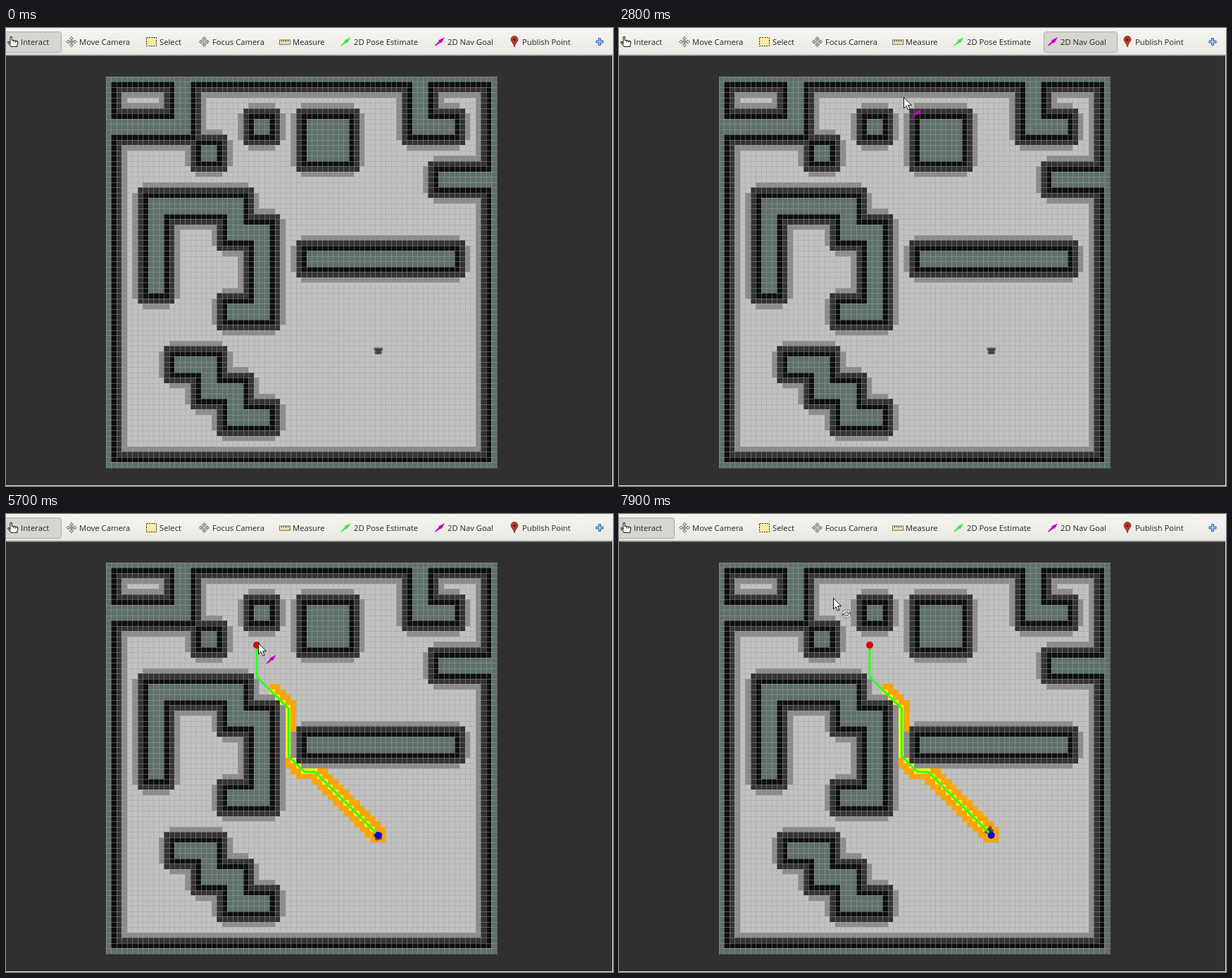
An HTML page with a canvas for the animation above (8000 ms loop, 862 by 650 pixels).

```html
<!DOCTYPE html>
<html lang="en">
<head>
<meta charset="utf-8">
<title>Grid path planning</title>
<style>
html, body { margin: 0; width: 100%; height: 100%; overflow: hidden; background: #303030; }
canvas, svg { position: absolute; left: 0; top: 0; display: block; }
text { font: 500 11.25px "Open Sans", "Noto Sans", sans-serif; fill: #262626; }
.btn { stroke-width: 1; }
.on { fill: #d7d5d0; stroke: #aaa8a2; }
.hover { fill: url(#lift); stroke: #b3b1ab; }

#interact, #navHover, #navOn, #plan, #route, #cursor, #goalIcon, #spinIcon {
  animation: 8s step-end infinite;
}
#interact { animation-name: interact; }
#navHover { animation-name: navHover; }
#navOn { animation-name: navOn; }
#plan, #route { animation-name: plan; }
#cursor { animation-name: show, move; }
#goalIcon { animation-name: goalIcon; }
#spinIcon { animation-name: spinIcon; }
#robot { animation: drive 8s steps(1) infinite; }

@keyframes interact { 0%, 50%, 100% { visibility: visible } 28.75% { visibility: hidden } }
@keyframes navHover { 0%, 28.75%, 100% { visibility: hidden } 10% { visibility: visible } }
@keyframes navOn { 0%, 50%, 100% { visibility: hidden } 28.75% { visibility: visible } }
@keyframes plan { 0% { visibility: hidden } 62.5%, 100% { visibility: visible } }
@keyframes show { 0% { visibility: hidden } 10%, 100% { visibility: visible } }
@keyframes goalIcon { 0%, 77.5%, 100% { visibility: hidden } 32.5% { visibility: visible } }
@keyframes spinIcon { 0% { visibility: hidden } 77.5%, 100% { visibility: visible } }
@keyframes move {
  0%, 10% { transform: translate(672px, 11px); animation-timing-function: steps(3) }
  13.75% { transform: translate(646px, 18px) }
  32.5% { transform: translate(659px, 12px); animation-timing-function: steps(2) }
  35% { transform: translate(404px, 98px) }
  36.25% { transform: translate(352px, 142px) }
  37.5% { transform: translate(336px, 180px); animation-timing-function: steps(2) }
  40% { transform: translate(336px, 217px); animation-timing-function: steps(2) }
  42.5% { transform: translate(344px, 224px) }
  43.75% { transform: translate(362px, 205px) }
  45% { transform: translate(364px, 190px) }
  46.25% { transform: translate(358px, 183px) }
  77.5% { transform: translate(375px, 184px); animation-timing-function: steps(3) }
  81.25% { transform: translate(550px, 205px) }
  82.5% { transform: translate(580px, 209px) }
  83.75% { transform: translate(589px, 210px); animation-timing-function: steps(3) }
  87.5% { transform: translate(570px, 209px) }
  88.75% { transform: translate(565px, 203px); animation-timing-function: steps(3) }
  92.5% { transform: translate(440px, 118px) }
  93.75% { transform: translate(385px, 100px) }
  95% { transform: translate(345px, 96px) }
  96.25% { transform: translate(320px, 102px); animation-timing-function: steps(2) }
  98.75%, 100% { transform: translate(304px, 119px) }
}
@keyframes drive {
  0%, 65% { transform: translate(528.7px, 458.2px); animation-timing-function: steps(9) }
  76.25% { transform: translate(528.4px, 457.2px) rotate(-20deg); animation-timing-function: steps(9) }
  87.5% { transform: translate(527.6px, 454.5px) rotate(-42deg); animation-timing-function: steps(9) }
  98.75%, 100% { transform: translate(525.8px, 449.8px) rotate(-45deg) }
}
</style>
</head>
<body>
<canvas id="map" width="862" height="650"></canvas>
<canvas id="plan" width="862" height="650"></canvas>
<svg width="862" height="650" viewBox="0 0 862 650">
  <defs>
    <linearGradient id="bar" x2="0" y2="1">
      <stop offset="0" stop-color="#f5f4f0"/><stop offset="1" stop-color="#eae8e1"/>
    </linearGradient>
    <linearGradient id="lift" x2="0" y2="1">
      <stop offset="0" stop-color="#ffffff"/><stop offset="1" stop-color="#f4f3f0"/>
    </linearGradient>
    <path id="dart" d="M0 12.2 6.4 5.4 5.6 4.6 14.5 0 9.8 8.2 8.7 7.4 1.6 12.6Z"/>
    <path id="cross" d="M7.5 0 10 3.2H8.3V6.7H11.8V5L15 7.5 11.8 10V8.3H8.3V11.8H10L7.5 15 5 11.8H6.7V8.3H3.2V10L0 7.5 3.2 5V6.7H6.7V3.2H5Z"/>
  </defs>

  <g id="robot" fill="#555">
    <path d="M-6-4.5H6L6.6-1.5 4.5 0 5.5 2.5 4 5H-4L-5.5 2.5-4.5 0-6.6-1.5Z"/>
    <path d="M-4-1.2H4M-2.5 2H2.5" stroke="#2c2c2c" stroke-width="1.4"/>
  </g>
  <g id="route">
    <path d="M356.2 186V231.5L401.4 276V344L424 366H439L528.5 455.5" fill="none" stroke="#30ff1c" stroke-width="3" stroke-linejoin="round"/>
    <circle cx="356" cy="186" r="5" fill="#e60000"/>
    <circle cx="528.7" cy="456" r="5" fill="#0808d0"/>
  </g>

  <rect width="862" height="38" fill="url(#bar)"/>
  <rect y="37" width="862" height="1" fill="#d2d0ca"/>
  <rect y="38" width="862" height="1.4" fill="#a3a29e"/>
  <path d="M861.5 39V650M0 649.5H862" stroke="#e9e8e4"/>
  <rect id="interact" class="btn on" x="-5.5" y="5.5" width="84" height="29" rx="3"/>
  <rect id="navHover" class="btn hover" x="603.5" y="5.5" width="104" height="29" rx="3"/>
  <rect id="navOn" class="btn on" x="603.5" y="5.5" width="104" height="29" rx="3"/>

  <path d="M6 22V13.3Q7.2 11.4 8.4 13.3V17.2L15 18.4Q17 18.8 16.7 21L15.5 26.5H7.2L2.7 20.8Q2.5 19 4.2 19.6Z" fill="#fff" stroke="#222" stroke-width="1.1"/>
  <path d="M10.8 18V20.5M13.4 18.5V20.8" stroke="#333"/>
  <use href="#cross" x="85.5" y="12" fill="#fff" stroke="#666"/>
  <circle cx="93" cy="19.5" r="2.2" fill="#999"/>
  <rect x="199.5" y="13.5" width="14" height="12" fill="#f7eca0" stroke="#222" stroke-dasharray="2 1.5"/>
  <g fill="none" stroke="#777">
    <use href="#cross" x="274" y="12" fill="#eee"/>
    <circle cx="281.5" cy="19.5" r="4.5"/>
  </g>
  <rect x="388.5" y="17" width="15" height="6.2" fill="#eee6b4" stroke="#77714f"/>
  <path d="M391.5 17V20M394.5 17V19.5M397.5 17V20M400.5 17V19.5" stroke="#55503a"/>
  <use href="#dart" x="475" y="13" fill="#35ee45"/>
  <use href="#dart" x="608.5" y="13" fill="#c000c0"/>
  <path d="M722 27Q721 23 718.4 19.8A5 5 0 1 1 725.6 19.8Q723 23 722 27Z" fill="#b83a2a" stroke="#872318" stroke-width=".7"/>
  <circle cx="722" cy="16.6" r="1.8" fill="#5d130d"/>
  <path d="M841.5 14.5H844.5V18H848V21H844.5V24.5H841.5V21H838V18H841.5Z" fill="#9cc0ec" stroke="#2c62ae"/>
  <g id="labels"></g>

  <g id="cursor">
    <path d="M.5.5V16L4 12.6 6.6 18.4 9 17.3 6.5 11.7H11.5Z" fill="#fff" stroke="#111" stroke-linejoin="round"/>
    <use id="goalIcon" href="#dart" x="11" y="17" fill="#c000c0"/>
    <g id="spinIcon" fill="none">
      <circle cx="18.8" cy="22.8" r="4.6" stroke="#555" stroke-width="3.6"/>
      <circle cx="18.8" cy="22.8" r="4.6" stroke="#f4f4f4" stroke-width="2" stroke-dasharray="12.4 2"/>
      <path d="M21 16.5 25 20.5 20.5 21ZM16.6 29.1 12.6 25.1 17.1 24.6Z" fill="#f4f4f4" stroke="#555" stroke-width=".7"/>
    </g>
  </g>
</svg>
<script>
const N = 74, SIZE = 7.5;
const px = c => Math.floor(142.4 + c * SIZE);
const py = r => Math.floor(69.4 + r * SIZE);
const context = id => document.getElementById(id).getContext('2d');

function fillCell(ctx, c, r, color) {
  ctx.fillStyle = color;
  ctx.fillRect(px(c), py(r), px(c + 1) - px(c), py(r + 1) - py(r));
}

// Obstacles as [column, row, width, height] in cells
const walls = [
  [0, 0, N, 1], [0, N - 1, N, 1], [0, 0, 1, N], [N - 1, 0, 1, N],
  [13, 0, 3, 11], [0, 8, 16, 3],
  [18, 13, 3, 3], [28, 8, 3, 3], [38, 8, 8, 8],
  [58, 0, 3, 11], [58, 8, 8, 3], [63, 18, 11, 3],
  [8, 23, 18, 3], [8, 23, 3, 18], [23, 23, 3, 8], [23, 28, 8, 3], [28, 28, 3, 18], [23, 43, 8, 3],
  [38, 33, 28, 3],
  [13, 53, 8, 3], [18, 53, 3, 8], [18, 58, 8, 3], [23, 58, 3, 8], [23, 63, 8, 3]
];

function clearance(c, r) {
  return Math.min(...walls.map(([x, y, w, h]) => Math.hypot(
    Math.max(x - c, 0, c - x - w + 1),
    Math.max(y - r, 0, r - y - h + 1))));
}

function shade(d) {
  if (d === 0) return '#5e706b';
  if (d < 1.5) return '#0e0e0e';
  if (d < 2.9) return '#333333';
  return d < 3.2 ? '#8c8c8c' : '#c1c1c0';
}

function drawMap() {
  const ctx = context('map');
  ctx.fillStyle = '#303030';
  ctx.fillRect(0, 0, 862, 650);
  for (let r = 0; r < N; r++)
    for (let c = 0; c < N; c++) fillCell(ctx, c, r, shade(clearance(c, r)));
  ctx.fillStyle = 'rgba(160,160,164,.45)';
  for (let i = 0; i <= N; i++) {
    ctx.fillRect(px(i), py(0), 1, N * SIZE + 1);
    ctx.fillRect(px(0), py(i), N * SIZE + 1, 1);
  }
}

function drawSearch() {
  const ctx = context('plan');
  const turns = [[51, 51], [39, 39], [37, 39], [34, 36], [34, 27], [31, 24]];
  const visited = [turns[0]];
  for (const [c, r] of turns.slice(1)) {
    let [x, y] = visited[visited.length - 1];
    while (x !== c || y !== r) {
      x += Math.sign(c - x);
      y += Math.sign(r - y);
      visited.push([x, y]);
    }
  }
  for (const [c, r] of visited)
    for (let dr = -1; dr <= 1; dr++)
      for (let dc = -1; dc <= 1; dc++)
        if (c + dc > 30 && clearance(c + dc, r + dr) > 3.2)
          fillCell(ctx, c + dc, r + dr, '#f9a60a');
  for (const [c, r] of visited) fillCell(ctx, c, r, '#f4f01c');
}

const labels = {
  'Interact': 21, 'Move Camera': 104, 'Select': 218, 'Focus Camera': 293, 'Measure': 407,
  '2D Pose Estimate': 494, '2D Nav Goal': 627, 'Publish Point': 733
};
document.getElementById('labels').innerHTML = Object.entries(labels)
  .map(([name, x]) => `<text x="${x}" y="24">${name}</text>`).join('');

drawMap();
drawSearch();
</script>
</body>
</html>
```
